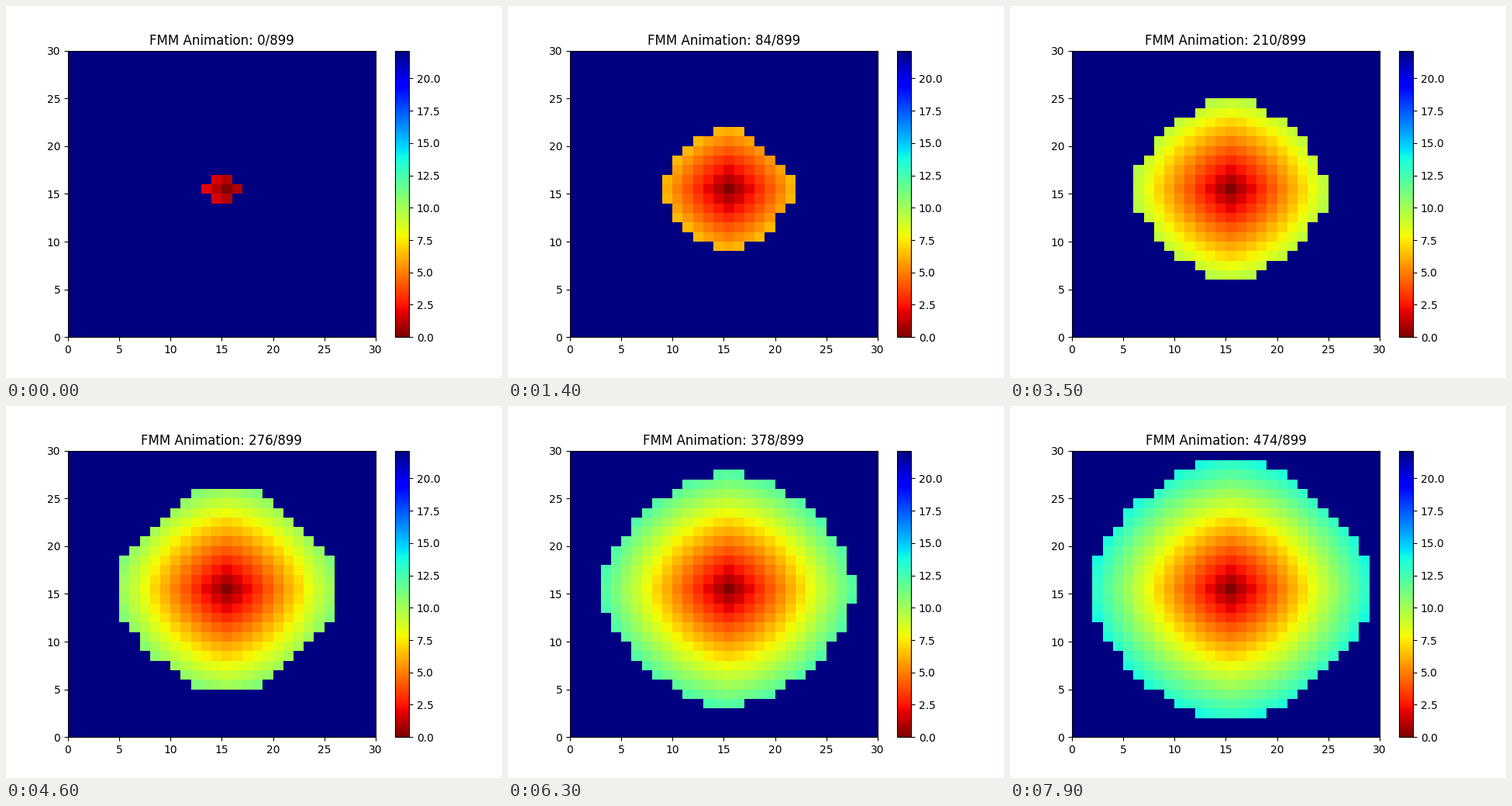
A matplotlib script that plays this animation: 640x480 px, repeating every 8000 ms.

```python
import numpy as np
import matplotlib.pyplot as plt
from matplotlib.animation import FuncAnimation

N = 30
SOURCE = (15, 15)
STEPS = N * N - 1
STRIDE = 6
FRAMES = 80


def neighbours(x, y):
    for dx, dy in ((-1, 0), (1, 0), (0, -1), (0, 1)):
        if 0 <= x + dx < N and 0 <= y + dy < N:
            yield x + dx, y + dy


def solve(T, x, y):
    """First-order upwind solution of |grad T| = 1 at one cell."""
    a = min(T[max(x - 1, 0), y], T[min(x + 1, N - 1), y])
    b = min(T[x, max(y - 1, 0)], T[x, min(y + 1, N - 1)])
    if abs(a - b) >= 1:
        return min(a, b) + 1
    return (a + b + np.sqrt(2 - (a - b) ** 2)) / 2


def march():
    """Arrival times after each accepted cell, ties taken in x, y order."""
    T = np.full((N, N), np.inf)
    T[SOURCE] = 0
    done = np.zeros((N, N), bool)
    trial = set()
    history = []
    cell = SOURCE
    while True:
        done[cell] = True
        trial.discard(cell)
        for p in neighbours(*cell):
            if not done[p]:
                T[p] = min(T[p], solve(T, *p))
                trial.add(p)
        if cell != SOURCE:
            history.append(T.copy())
        if not trial:
            return history
        # rounding keeps symmetric cells tied
        cell = min(trial, key=lambda p: (round(T[p], 9), p))


history = march()
vmax = history[-1].max()


def field(step):
    return np.minimum(history[step], vmax).T


def title(step):
    return f"FMM Animation: {step}/{STEPS}"


fig, ax = plt.subplots(figsize=(6.4, 4.8), dpi=100)
mesh = ax.pcolormesh(field(0), cmap="jet_r", vmin=0, vmax=vmax)
fig.colorbar(mesh, ax=ax)
label = ax.set_title(title(0))


def update(i):
    step = i * STRIDE
    mesh.set_array(field(step))
    label.set_text(title(step))
    return mesh, label


anim = FuncAnimation(fig, update, frames=FRAMES, interval=100,
                     repeat=True, repeat_delay=0, blit=False)
plt.show()
```
